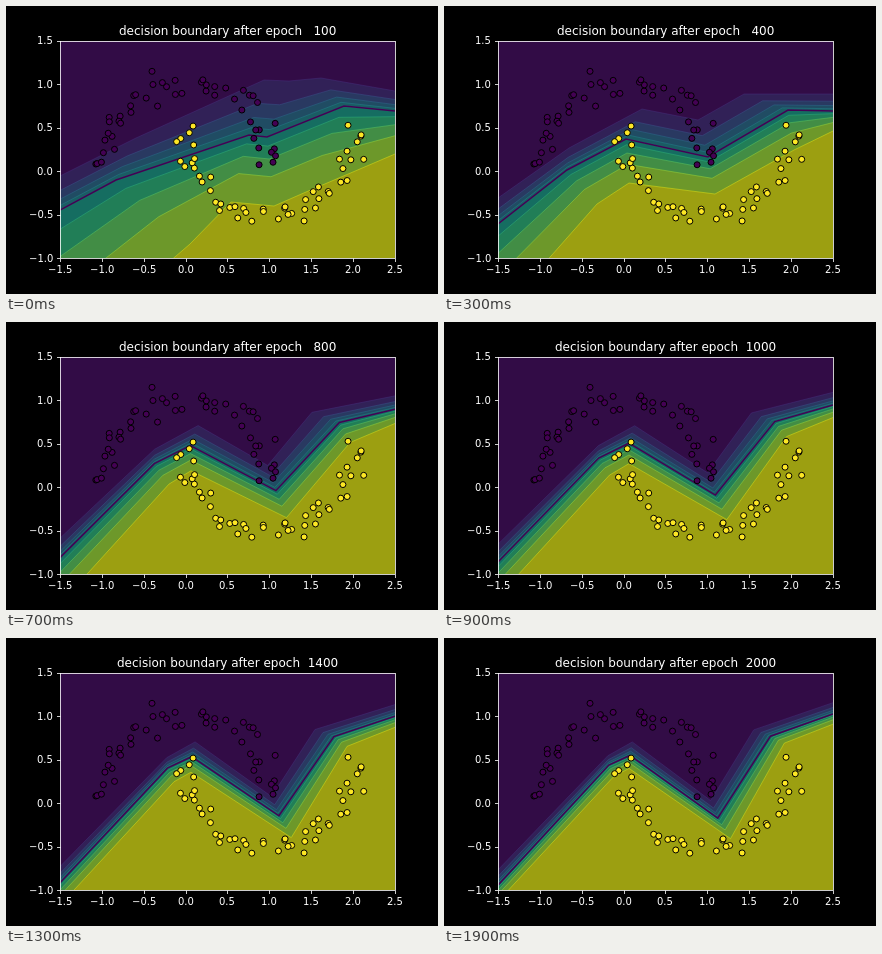
An HTML page with a canvas for the animation above (2000 ms loop, 432x288 px).

```html
<!DOCTYPE html>
<html lang="en">
<head>
<meta charset="utf-8">
<title>Decision boundary</title>
<style>
  html, body { margin: 0; width: 100%; height: 100%; overflow: hidden; background: #000; }
  canvas { display: block; }
</style>
</head>
<body>
<canvas id="stage" width="432" height="288"></canvas>
<script>
const ctx = document.getElementById('stage').getContext('2d');
const box = { left: 54, top: 35, right: 389, bottom: 252 };
const toX = v => 54 + (v + 1.5) * 83.7;
const toY = v => 252 - (v + 1) * 86.976;
const snap = v => Math.floor(v + 0.5) + 0.5;
const logit = p => Math.log(p / (1 - p));
const mix = (a, b, u) => a.map((v, i) => v + (b[i] - v) * u);

// A line: y at the left edge, then rise, peak, valley and shoulder as x,y, then y at the right edge.
const early = {
  low:  [170, 130,132, 258,74, 283,75, 315,72, 85],
  mid:  [204, 110,174, 243,129, 261,131, 338,100, 105],
  high: [350, 184,238, 225,196, 268,200, 300,186, 148]
};
const bending = {
  low:  [192, 125,142, 198,103, 254,114, 300,88, 88],
  mid:  [218, 123,164, 182,133, 264,151, 344,104, 105],
  high: [310, 153,198, 185,177, 271,188, 350,144, 125]
};
const settled = {
  low:  [233, 165,117, 188,104, 267,164, 310,92, 64],
  mid:  [248, 166,126, 186,117, 274,181, 326,98, 75],
  high: [262, 170,137, 185,129, 287,201, 340,104, 85]
};
const bendStep = 3;

// Ten steps of the viridis palette
const bands = [
  [71,17,100], [70,47,124], [59,82,139], [46,108,142], [37,132,142],
  [30,155,138], [47,180,124], [94,201,98], [155,217,60], [223,227,24]
];

function poseAt(step) {
  const blend = (a, b, u) => ({
    low: mix(a.low, b.low, u), mid: mix(a.mid, b.mid, u), high: mix(a.high, b.high, u)
  });
  return step < bendStep
    ? blend(early, bending, step / bendStep)
    : blend(bending, settled, 1 - Math.exp((bendStep - step) / 4.5));
}

function contour(pose, probability) {
  const z = logit(probability) / logit(0.9);
  return mix(pose.mid, z < 0 ? pose.low : pose.high, Math.abs(z) ** 1.2);
}

function trace(line) {
  ctx.beginPath();
  ctx.moveTo(box.left, line[0]);
  for (let i = 1; i < 9; i += 2) ctx.lineTo(line[i], line[i + 1]);
  ctx.lineTo(box.right, line[9]);
}

function drawField(step) {
  const pose = poseAt(step);
  ctx.save();
  ctx.beginPath();
  ctx.rect(box.left, box.top, box.right - box.left, box.bottom - box.top);
  ctx.clip();
  bands.forEach((color, i) => {
    ctx.fillStyle = `rgb(${color.map(c => Math.round(c * 0.7))})`;
    if (i === 0) return ctx.fillRect(0, 0, 432, 288);
    const line = contour(pose, i / 10);
    trace(line);
    ctx.lineTo(box.right, 400);
    ctx.lineTo(box.left, 400);
    ctx.fill();
    trace(line);
    ctx.strokeStyle = `rgba(${color}, 0.6)`;
    ctx.lineWidth = 0.8;
    ctx.stroke();
  });
  trace(pose.mid);
  ctx.strokeStyle = 'rgb(68, 1, 84)';
  ctx.lineWidth = 1.5;
  ctx.stroke();
  ctx.restore();
}

function seededNormal(seed) {
  const uniform = () => (seed = (seed * 16807) % 2147483647) / 2147483647;
  return () => Math.sqrt(-2 * Math.log(uniform())) * Math.cos(2 * Math.PI * uniform());
}

// Two interleaved half circles with a little noise
const normal = seededNormal(20011);
const moon = place => Array.from({ length: 50 }, (_, i) =>
  place(Math.PI * i / 49).map(v => v + 0.08 * normal()));
const upperMoon = moon(a => [Math.cos(a), Math.sin(a)]);
const lowerMoon = moon(a => [1 - Math.cos(a), 0.5 - Math.sin(a)]);

function drawDots(points, color) {
  ctx.fillStyle = color;
  ctx.strokeStyle = '#000';
  ctx.lineWidth = 1;
  for (const [x, y] of points) {
    ctx.beginPath();
    ctx.arc(toX(x), toY(y), 3, 0, 2 * Math.PI);
    ctx.fill();
    ctx.stroke();
  }
}

function segment(x1, y1, x2, y2) {
  ctx.beginPath();
  ctx.moveTo(x1, y1);
  ctx.lineTo(x2, y2);
  ctx.stroke();
}

// align: 0.5 centres the text on x, 1 ends it there
function write(text, size, x, y, align) {
  ctx.font = `${size}px "DejaVu Sans", sans-serif`;
  ctx.fillText(text, Math.round(x - ctx.measureText(text).width * align), Math.round(y));
}

function drawAxes() {
  const label = v => v.toFixed(1).replace('-', '\u2212');
  ctx.strokeStyle = ctx.fillStyle = '#fff';
  ctx.lineWidth = 0.8;
  ctx.strokeRect(54.5, 35.5, 335, 217);
  for (let v = -1.5; v <= 2.5; v += 0.5) {
    const x = snap(toX(v));
    segment(x, 252.5, x, 256);
    write(label(v), 10, toX(v), 267, 0.5);
  }
  for (let v = -1; v <= 1.5; v += 0.5) {
    const y = snap(toY(v));
    segment(51, y, 54.5, y);
    write(label(v), 10, 47, toY(v) + 3.8, 1);
  }
}

function draw(step) {
  ctx.fillStyle = '#000';
  ctx.fillRect(0, 0, 432, 288);
  drawField(step);
  drawDots(upperMoon, 'rgb(68, 1, 84)');
  drawDots(lowerMoon, 'rgb(253, 231, 37)');
  drawAxes();
  const epoch = String((step + 1) * 100).padStart(5);
  write(`decision boundary after epoch ${epoch}`, 12, 221.4, 29, 0.5);
}

const start = performance.now();
let shown = -1;
function tick() {
  const step = Math.floor((performance.now() - start) % 2000 / 100);
  if (step !== shown) draw(shown = step);
  requestAnimationFrame(tick);
}
tick();
</script>
</body>
</html>
```
